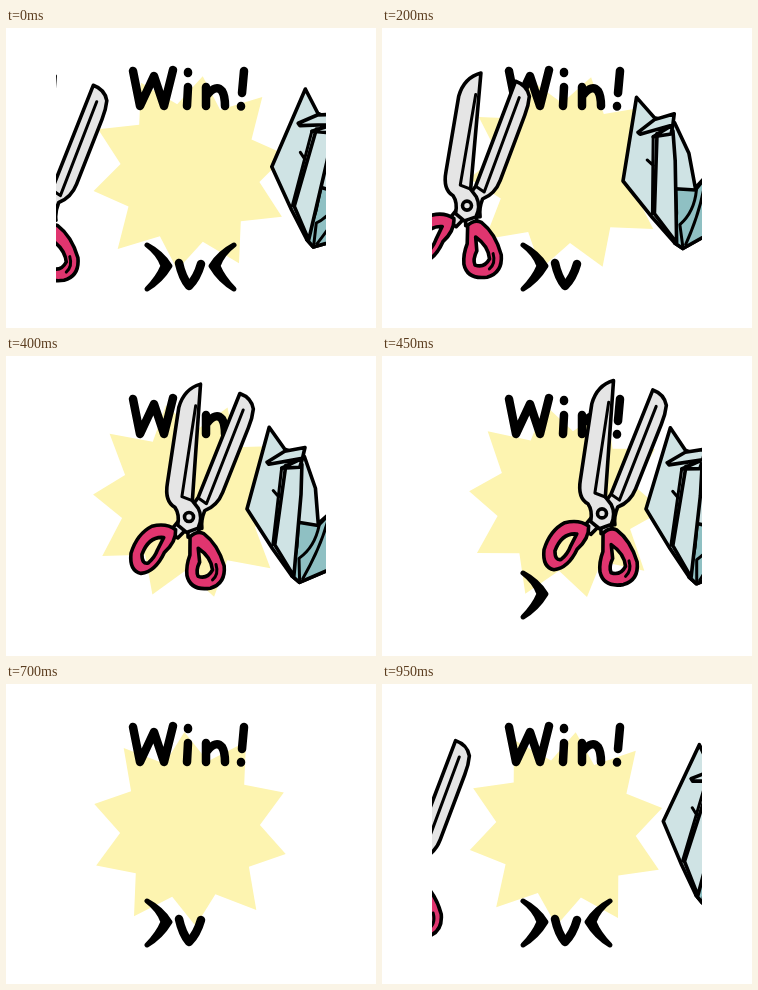
Write an HTML page that moves like this. It is 370 px wide and 300 px high and loops after 1000 ms.

```html
<!DOCTYPE html>
<html lang="en">
<head>
<meta charset="utf-8">
<title>Win!</title>
<style>
html, body { margin: 0; width: 100%; height: 100%; overflow: hidden; background: #fff; }
svg { display: block; width: 370px; height: 300px; }
path, circle { stroke: #000; stroke-width: 3.6; stroke-linejoin: round; stroke-linecap: round; }
#star { fill: #fdf4b0; stroke: none; }
.pen { fill: none; stroke-width: 8.5; }
.brush { stroke-width: 5; }
.line { fill: none; stroke-width: 3; }
.steel { fill: #e5e5e5; }
.grip { fill: #e0356f; fill-rule: evenodd; }
.light { fill: #cfe3e4; }
.dark { fill: #8fc0c3; }
</style>
</head>
<body>
<svg viewBox="0 0 370 300" role="img" aria-label="Win! &gt;v&lt;">
  <clipPath id="view"><rect x="50" y="15" width="270" height="270"/></clipPath>
  <g clip-path="url(#view)">
    <path id="star"/>

    <g id="word">
      <path class="pen" d="M127 43L134 78L148 48L158 78L167 42"/>
      <path class="pen" d="M182 44v1M182 59L181 78"/>
      <path class="pen" d="M200 59V78M201 67Q210 56 216 63Q219 68 219 78"/>
      <path class="pen" d="M238 43L236 65M235 78v.5"/>
    </g>
    <g id="face">
      <path class="brush" id="eye" d="M141 217Q156 225 164 238Q155 253 141 261Q152 250 157 238Q153 226 141 217Z"/>
      <path class="pen" d="M173 235Q176 249 183 258Q191 250 195 236"/>
      <use href="#eye" transform="translate(369) scale(-1 1)"/>
    </g>

    <!-- Folded paper, placed by its left corner -->
    <g id="paper">
      <path class="light" d="M17 -83L34 -62L54 -56L67 -25L72 10L84 -2L110 20L100 48L57 70L49 64L28 38L0 0Z"/>
      <path class="dark" d="M52 10L72 12L84 -2L110 20L100 48L57 70L49 64L52 34Z"/>
      <path class="line" d="M73 12Q70 34 55 46L57 68M82 4Q76 34 60 66"/>
      <path class="light" d="M36 -46L52 -48L53 -18L51 64L30 34Z"/>
      <path class="line" d="M32 -43L28 34M25 -20L31 -14"/>
      <path class="light" d="M17 -48L34 -60L54 -65L52 -53L50 -45L32 -43L52 -54L19 -46Z"/>
    </g>

    <!-- Two rigid halves that turn about the screw -->
    <g id="scissors">
      <g id="right">
        <path class="steel" d="M-8 2L-18 17L-9 22L4 6Z"/>
        <path class="grip" d="M-12 14Q-22 8 -36 13Q-50 22 -54 42Q-54 60 -42 61Q-28 58 -21 38Q-10 26 -12 14ZM-23 23Q-38 23 -43 42Q-42 52 -36 50Q-30 44 -28 36Z"/>
        <path class="steel" d="M38 -128Q50 -125 53 -114Q53 -105 50 -95L31 -28Q27 -14 15 -8Q12 2 14 10L2 12L-6 1L7 -20Z"/>
        <path class="line" d="M43 -112L16 -15L7 -20"/>
      </g>
      <g id="left">
        <path class="steel" d="M-2 8L-3 20L9 18L7 6Z"/>
        <path class="grip" d="M-1 20Q6 14 13 18Q26 30 30 52Q30 70 14 73Q-6 74 -8 58Q-8 48 -3 38ZM6 32Q18 42 18 55Q12 64 3 60Q1 54 6 46Z"/>
        <path class="line" d="M22 50Q24 60 17 65"/>
        <path class="steel" d="M25 -131Q8 -128 1 -110L-18 -36Q-23 -18 -13 -11Q-9 -4 -12 7L-4 15L8 12Q14 2 10 -8L5 -16Z"/>
        <path class="line" d="M18 -110L-5 -21L5 -16"/>
      </g>
      <circle class="steel" r="4.5"/>
    </g>
  </g>
</svg>
<script>
const STEP = 50, STEPS = 20, LEAD = 3, TIPS = 10;
const { sin, cos, abs, min, max, PI, sqrt } = Math;
const $ = id => document.getElementById(id);
const ramp = v => max(0, v);
const place = (id, x, y, turn = 0) =>
  $(id).setAttribute('transform', `translate(${x} ${y}) rotate(${turn})`);

// A slightly squarish burst that turns by one tip per loop
function drawStar(step) {
  const gap = 2 * PI / TIPS;
  const start = -154.5 * PI / 180 + gap * step / STEPS;
  const pts = [];
  for (let i = 0; i < TIPS * 2; i++) {
    const a = start + gap * i / 2;
    const r = i % 2 ? 70 : 101 - 4 * cos(4 * a);
    pts.push([184 + r * cos(a), 145 + r * sin(a)].map(v => v.toFixed(1)));
  }
  $('star').setAttribute('d', 'M' + pts.join('L') + 'Z');
}

// Shows the first n letters of a line
function type(id, n) {
  [...$(id).children].forEach((c, i) => { c.style.display = i < n ? '' : 'none'; });
}

// u counts steps from the moment both objects enter
function drawScissors(u) {
  const k = min(1, ramp(u - 5) / 9);
  const snip = u < 9 ? u / 9 : min(1, (u - 9) / 5);
  const open = 6 * sqrt(ramp(sin(PI * snip)));
  place('scissors', 1 + 12 * u + 25 * ramp(u - 9), 181 - 27 * k * k * (3 - 2 * k));
  place('left', 0, 0, -open);
  place('right', 0, 0, open);
}

function drawPaper(u) {
  const slide = 4.6;
  const hop = sin(PI * min(1, u / slide));
  const x = 241 + 15.5 * ramp(slide - u) + 23 * ramp(u - 11);
  place('paper', x, 153 - 16 * hop, -6 + 20 * hop + 1.5 * ramp(u - slide));
}

function draw(step) {
  const u = (step + LEAD) % STEPS;
  drawStar(step);
  type('word', u > 0 && u < 18 ? 4 : 3);
  type('face', min(u > 0 && u < 5 ? 3 : 2, abs(u - 11)));
  drawScissors(u);
  drawPaper(u);
}

function tick() {
  draw(Math.floor(performance.now() / STEP) % STEPS);
  requestAnimationFrame(tick);
}
tick();
</script>
</body>
</html>
```
